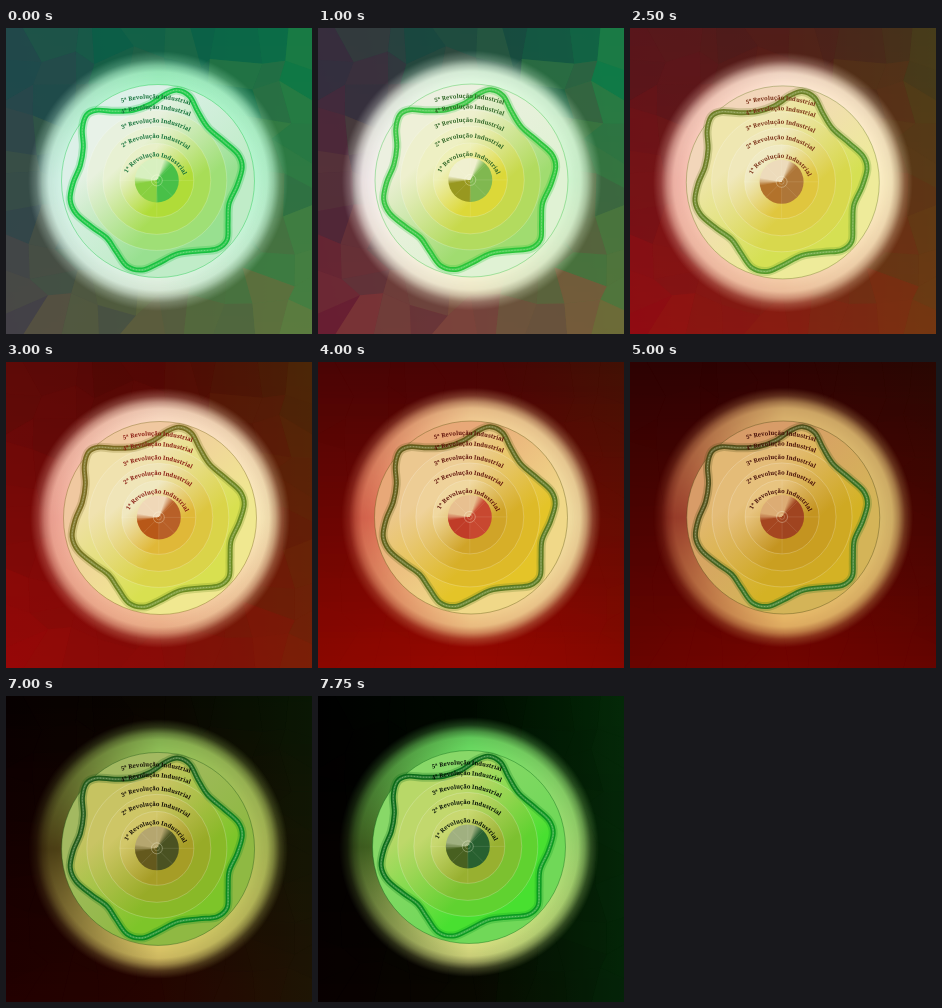
Write an HTML page with a canvas that moves like this. It is 306 px wide and 306 px high and loops after 8000 ms.

```html
<!DOCTYPE html>
<html lang="pt">
<head>
<meta charset="utf-8">
<style>
html, body { margin: 0; width: 100%; height: 100%; overflow: hidden; background: #000; }
canvas, svg { position: absolute; left: 0; top: 0; width: 306px; height: 306px; }
text { font-family: "Noto Serif", serif; font-weight: 700; font-size: 5.85px; text-anchor: middle; }
</style>
</head>
<body>
<canvas id="stage" width="306" height="306"></canvas>
<svg viewBox="0 0 306 306"><defs id="arcs"></defs><g id="labels"></g></svg>
<script>
const SIZE = 306, LOOP = 8000, STEP = 250, TAU = Math.PI * 2;

// sky: 3 x 2 grid; rim: top right bottom left; core: upper left, right, bottom
// the other pairs run from upper left to lower right
const KEYS = [
  { t: 0, x: 0, y: 0, rough: .3,
    sky: '1c4a4c 0c6048 0c7a45 484048 60603c 5a8040', rim: 'a0f0c0 b8f4d0 e0f0e0 d0f0e4',
    disc: 'dcf0e8 c0ecc8', body: 'e8f2e8 98e090', ring: 'e8f0c8 b0dc38',
    core: 'd8f0c0 48c048 88d040', line: '18c848 18c040', text: '127038' },
  { t: 1000, x: 1.5, y: -.5, rough: .3,
    sky: '303040 184a40 0a8048 701c30 80483c 6a7038', rim: 'e0f8e0 d0f4d0 f4f0d0 f4ecec',
    disc: 'ecf0e0 e0f2d4', body: 'eef0d8 a0dc70', ring: 'eef0b8 dcd838',
    core: 'f0f0d0 80b850 989820', line: '38c444 28c438', text: '2e6424' },
  { t: 1750, x: -1, y: -1, rough: .25,
    sky: '4a2a3a 4a3c3a 3a6038 901020 8a3820 6a6020', rim: 'fff4e8 fcf4d0 f8e4c8 fcd8d0',
    disc: 'f4ece0 ecf0a8', body: 'eef0b0 d0e058', ring: 'f0ecc8 e0dc48',
    core: 'e8e0c0 a09850 a89848', line: '5a9a30 3ab038', text: '5e4818' },
  { t: 3000, x: 2, y: 3, rough: .2,
    sky: '5a0a08 500804 482808 9a0808 8a0c08 7a2008', rim: 'f8d8c0 f8e8b8 f0b890 f0a898',
    disc: 'f0c8a0 f0e890', body: 'f0e0a8 d8e050', ring: 'f0e8c0 e0b838',
    core: 'f0d8b8 b86028 b85818', line: '7a6a20 6a8a20', text: '881a10' },
  { t: 4000, x: 1, y: 2.5, rough: .03,
    sky: '4a0404 480404 421004 8c0800 980800 880800', rim: 'f0c890 f0dca0 f0c888 d86850',
    disc: 'e8a878 f0d888', body: 'ecc890 e4c428', ring: 'f0d8a0 d0a428',
    core: 'e8c090 c84830 c03c28', line: '625a18 5a7820', text: '5e1008' },
  { t: 6000, x: 1.5, y: 2.5, rough: .03,
    sky: '100000 140000 100000 480000 500000 440000', rim: 'c09848 c09838 e0a848 601808',
    disc: 'c89058 b89028', body: 'd8a858 c4a020', ring: 'e0b060 b88418',
    core: 'd09858 784010 8a5018', line: '404018 0a7020', text: '2a0804' },
  { t: 7750, x: -1, y: -2, rough: .1,
    sky: '000000 000a00 042a08 080000 080800 042408', rim: '68d860 a0d870 d8dc80 406020',
    disc: '88d868 70d858', body: 'b8d868 48e030', ring: 'c8d870 98b030',
    core: 'a0b080 286030 486020', line: '0a6a18 0a9a20', text: '041004' }
];
const PARTS = ['sky', 'rim', 'disc', 'body', 'ring', 'core', 'line', 'text'];
const rgb = h => [0, 2, 4].map(i => parseInt(h.slice(i, i + 2), 16));
for (const k of KEYS) for (const p of PARTS) k[p] = k[p].split(' ').map(rgb);

const WAVE = [[82, 88], [92, 83], [110, 84], [128, 83], [145, 77], [160, 67], [172, 63], [184, 69],
  [192, 84], [202, 100], [218, 114], [232, 127], [236, 140], [231, 158], [223, 176], [222, 195],
  [221, 212], [211, 221], [193, 223], [172, 226], [152, 236], [137, 242], [122, 238], [111, 223],
  [102, 210], [87, 199], [72, 186], [66, 172], [69, 155], [76, 138], [79, 120], [78, 102]];

const lerp = (a, b, f) => a + (b - a) * f;
const mix = (a, b, f) => a.map((v, i) => lerp(v, b[i], f));
const css = (c, a = 1) => `rgba(${c.map(Math.round)},${a})`;

function poseAt(ms) {
  const i = Math.max(0, KEYS.findLastIndex(k => k.t <= ms));
  const a = KEYS[i], b = KEYS[i + 1] || a;
  const f = b === a ? 0 : (ms - a.t) / (b.t - a.t);
  const pose = {};
  for (const n of ['x', 'y', 'rough']) pose[n] = lerp(a[n], b[n], f);
  for (const p of PARTS) pose[p] = a[p].map((c, j) => mix(c, b[p][j], f));
  return pose;
}

// Irregular backdrop facets
let seed = 7;
const rnd = () => (seed = seed * 16807 % 2147483647) / 2147483647;
const N = 10, CELL = SIZE / N;
const knots = Array.from({ length: (N + 1) ** 2 }, (_, i) => {
  const c = i % (N + 1), r = Math.floor(i / (N + 1));
  const jit = n => n % N ? (rnd() - .5) * CELL * .9 : 0;
  return [c * CELL + jit(c), r * CELL + jit(r)];
});
const facets = Array.from({ length: N * N }, (_, i) => {
  const c = i % N, r = Math.floor(i / N), k = r * (N + 1) + c;
  return { pts: [k, k + 1, k + N + 2, k + N + 1].map(j => knots[j]),
    u: (c + .5) / N, v: (r + .5) / N, du: rnd() - .5, dv: rnd() - .5 };
});

const closedPath = pts => {
  const p = new Path2D(), n = pts.length, at = i => pts[(i + n) % n];
  p.moveTo(...pts[0]);
  for (let i = 0; i < n; i++) {
    const [a, b, c, d] = [at(i - 1), at(i), at(i + 1), at(i + 2)];
    p.bezierCurveTo(b[0] + (c[0] - a[0]) / 6, b[1] + (c[1] - a[1]) / 6,
      c[0] - (d[0] - b[0]) / 6, c[1] - (d[1] - b[1]) / 6, ...c);
  }
  p.closePath();
  return p;
};
const wave = closedPath(WAVE.map(([x, y]) => [(x - 152) * 1.012 - .8, (y - 153) * 1.005 - .4]));
const disk = r => { const p = new Path2D(); p.arc(0, 0, r, 0, TAU); return p; };

const ctx = document.getElementById('stage').getContext('2d');
const halo = document.createElement('canvas');
halo.width = halo.height = SIZE;
const hctx = halo.getContext('2d');

function drawSky({ sky, rough }) {
  const clamp = v => Math.min(1, Math.max(0, v));
  const band = 6;
  for (let y = 0; y < SIZE; y += band) {
    const g = ctx.createLinearGradient(0, 0, SIZE, 0);
    for (let c = 0; c < 3; c++) g.addColorStop(c / 2, css(mix(sky[c], sky[c + 3], y / SIZE)));
    ctx.fillStyle = g;
    ctx.fillRect(0, y, SIZE, band);
  }
  ctx.globalAlpha = clamp(rough * 3);
  for (const q of facets) {
    const u = clamp(q.u + q.du * rough) * 2, v = clamp(q.v + q.dv * rough);
    const c = u < 1 ? 0 : 1, f = u - c;
    ctx.fillStyle = css(mix(mix(sky[c], sky[c + 1], f), mix(sky[c + 3], sky[c + 4], f), v));
    ctx.beginPath();
    q.pts.forEach(p => ctx.lineTo(...p));
    ctx.fill();
  }
  ctx.globalAlpha = 1;
}

function drawHalo({ rim }) {
  hctx.globalCompositeOperation = 'source-over';
  const cone = hctx.createConicGradient(-Math.PI / 2, 153, 153);
  [0, 1, 2, 3, 0].forEach((j, i) => cone.addColorStop(i / 4, css(rim[j])));
  hctx.fillStyle = cone;
  hctx.fillRect(0, 0, SIZE, SIZE);
  const fade = hctx.createRadialGradient(153, 153, 98, 153, 153, 130);
  [[0, 1], [.35, .93], [.55, .66], [.75, .25], [1, 0]].forEach(([s, a]) => fade.addColorStop(s, `rgba(0,0,0,${a})`));
  hctx.globalCompositeOperation = 'destination-in';
  hctx.fillStyle = fade;
  hctx.fillRect(0, 0, SIZE, SIZE);
  ctx.drawImage(halo, -153, -153);
}

function slope(r, [a, b]) {
  const g = ctx.createLinearGradient(-r * .65, -r * .7, r * .65, r * .7);
  g.addColorStop(.15, css(a));
  g.addColorStop(.75, css(b));
  return g;
}

function drawWheel({ disc, body, ring, core, line }) {
  const fill = (path, style) => { ctx.fillStyle = style; ctx.fill(path); };
  const stroke = (path, style, w) => { ctx.strokeStyle = style; ctx.lineWidth = w; ctx.stroke(path); };

  fill(disk(96.5), slope(96, disc));
  stroke(disk(96.5), css(line[0], .5), .8);
  fill(wave, slope(90, body));

  ctx.save();
  ctx.translate(-1.2, -.6);
  [[70, .3], [54, .65], [37, 1]].forEach(([r, f]) => {
    fill(disk(r), slope(r, body.map((c, i) => mix(c, ring[i], f))));
    stroke(disk(r), 'rgba(255,255,255,.2)', 1);
  });

  const [pale, right, low] = core.map(c => css(c));
  const cone = ctx.createConicGradient(0, 0, 0);
  [[0, right], [.24, right], [.26, low], [.47, low], [.53, pale], [.8, pale], [.87, right], [1, right]]
    .forEach(s => cone.addColorStop(...s));
  fill(disk(22), cone);

  const spokes = new Path2D();
  for (let i = 0; i < 8; i++) {
    const a = i * TAU / 8, r = i % 2 ? 22 : 37;
    spokes.moveTo(5 * Math.cos(a), 5 * Math.sin(a));
    spokes.lineTo(r * Math.cos(a), r * Math.sin(a));
  }
  stroke(spokes, 'rgba(255,255,230,.15)', .7);
  stroke(disk(5.5), 'rgba(255,255,230,.4)', .8);
  stroke(disk(2.5), 'rgba(255,255,230,.3)', .7);
  ctx.restore();

  const tube = slope(90, line);
  ctx.globalAlpha = .25;
  stroke(wave, tube, 9);
  ctx.globalAlpha = 1;
  stroke(wave, tube, 5);
  stroke(wave, 'rgba(240,255,215,.2)', 2);
  ctx.setLineDash([1.2, 1.8]);
  stroke(wave, 'rgba(240,255,215,.3)', .9);
  ctx.setLineDash([]);
}

// Each label: ordinal, baseline top, arc radius
const LABELS = [[5, 70.5, 110], [4, 81, 100], [3, 94.5, 74], [2, 110, 55], [1, 128.5, 31]];
const labels = document.getElementById('labels');
for (const [n, y, r] of LABELS) {
  const cx = 150, a = Math.min(1.45, 45 / r), dx = r * Math.sin(a), dy = r * (1 - Math.cos(a));
  document.getElementById('arcs').innerHTML +=
    `<path id="arc${n}" d="M${cx - dx} ${y + dy}A${r} ${r} 0 0 1 ${cx + dx} ${y + dy}"/>`;
  labels.innerHTML += `<text transform="rotate(2 ${cx} ${y})"><textPath href="#arc${n}" startOffset="50%">${n}ª Revolução Industrial</textPath></text>`;
}

let shown = -1;
function draw(now) {
  const ms = Math.floor(now % LOOP / STEP) * STEP;
  if (ms !== shown) {
    shown = ms;
    const pose = poseAt(ms);
    ctx.setTransform(1, 0, 0, 1, 0, 0);
    drawSky(pose);
    ctx.translate(152 + pose.x, 153 + pose.y);
    drawHalo(pose);
    drawWheel(pose);
    labels.setAttribute('transform', `translate(${pose.x} ${pose.y})`);
    labels.setAttribute('fill', css(pose.text[0]));
  }
}
const start = performance.now();
const tick = () => { draw(performance.now() - start); requestAnimationFrame(tick); };
tick();
</script>
</body>
</html>
```
